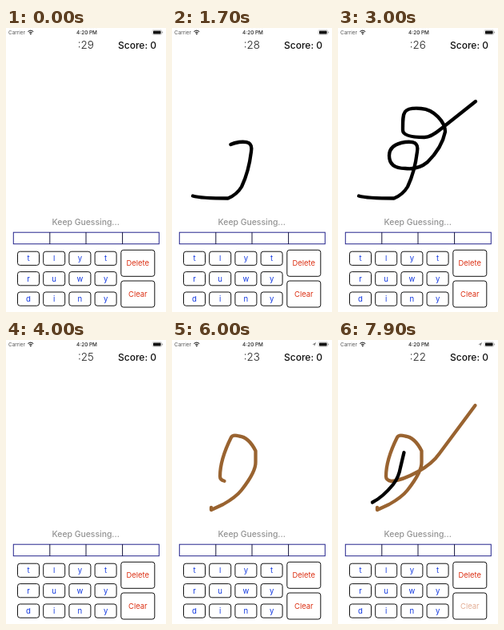
An HTML page for the animation above (8 s loop, 200x356 px).

```html
<!DOCTYPE html>
<html lang="en">
<head>
<meta charset="utf-8">
<title>Drawing game</title>
<style>
  html, body { margin: 0; width: 100%; height: 100%; overflow: hidden; background: #fff; }
  svg { display: block; width: 100%; height: 100%; }
  text { font-family: Inter, Roboto, sans-serif; text-anchor: middle; }
  .status { font-size: 6.4px; fill: #555; }
  .key { fill: #fff; stroke: #111; }
  .letter { font-size: 9.6px; fill: #1238e0; }
  .action { font-size: 9.4px; fill: #dc3014; }
  .pressed { fill: #e3ad94; }
  .ink { fill: none; stroke-width: 4.3; stroke-linecap: round; stroke-linejoin: round; }
</style>
</head>
<body>
<svg id="stage" viewBox="0 0 200 356" preserveAspectRatio="none">
  <rect width="200" height="356" fill="#fff"/>
  <text class="status" x="13.5" y="7.8">Carrier</text>
  <g fill="none" stroke="#333" stroke-width="1.1">
    <path d="M27.4 4.6Q30.8 1.6 34.2 4.6M28.9 6.2Q30.8 4.6 32.7 6.2"/>
    <circle cx="30.8" cy="7.4" r=".4"/>
  </g>
  <text class="status" x="101" y="7.8" font-weight="500" style="fill:#222">4:20 PM</text>
  <path id="arrow" d="M175.4 5.4L180.2 3L177.9 8L177.6 5.7Z" fill="#777"/>
  <rect x="183" y="2.4" width="11.6" height="6" rx="1.5" fill="none" stroke="#aaa" stroke-width=".5"/>
  <rect x="184" y="3.4" width="9.6" height="4" rx=".7" fill="#111"/>
  <rect x="195.2" y="4.4" width=".9" height="2" rx=".4" fill="#888"/>

  <text id="timer" x="99.8" y="26.2" font-size="13.4" font-weight="300" fill="#222"></text>
  <text x="164" y="25.8" font-size="12" font-weight="500" fill="#111">Score: 0</text>

  <g id="drawing"></g>

  <text x="99.7" y="246.9" font-size="10.4" font-weight="500" fill="#929292">Keep Guessing...</text>
  <rect x="9.3" y="256.2" width="182" height="14.5" fill="none" stroke="#23238c"/>
  <path d="M54.8 256V271M100 256V271M145.6 256V271" stroke="#14143c"/>
  <g id="keys"></g>
</svg>
<script>
const LOOP = 8000, STEP = 100;
const $ = id => document.getElementById(id);

function add(parent, tag, attrs, text = "") {
  const el = document.createElementNS("http://www.w3.org/2000/svg", tag);
  for (const name in attrs) el.setAttribute(name, attrs[name]);
  el.textContent = text;
  return parent.appendChild(el);
}

function addKey(label, kind, x, y, width, height) {
  add($("keys"), "rect", { class: "key", x, y, width, height, rx: 3 });
  return add($("keys"), "text", { class: kind, x: x + width / 2, y: y + height / 2 + 3.4 }, label);
}

["tlyt", "ruwy", "diny"].forEach((row, r) =>
  [...row].forEach((ch, c) => addKey(ch, "letter", 14.5 + c * 32.2, 280.2 + r * 25.4, 27, 17.2)));
addKey("Delete", "action", 143.8, 278.3, 42, 33);
const clearLabel = addKey("Clear", "action", 143.8, 317, 42, 33);

// The pen covers each path from start to end; power shapes its speed
const strokes = [
  { color: "#000", start: 1000, end: 3000, until: 4000, power: 1.1,
    d: `M26 210.5Q36 213.5 70 213.5Q81 209 87 199Q96 180 99 155
      C101 143 94 142 84 143Q64 146 64 160Q64 176 84 176Q100 178 112 168Q130 150 134 130
      C134 118 120 102 104 101C80 99 81 106 81 128Q81 137 108 137Q116 137 128 127L172 92` },
  { color: "#996330", start: 5400, end: 6200, until: LOOP, power: 1.9,
    d: `M49 210V213L64 206Q80 197 87 188Q105 165 104.5 153V139Q96 122 84 120.5
      Q76 118 74 122Q60 150 60 171Q60 176 67 177Q80 176 100 165Q118 155 127 142L171.5 82` },
  { color: "#000", start: 7000, end: 7900, until: LOOP, power: 1,
    d: "M43 203.5Q56 197 69 181Q76 172 78 160L82.5 141" }
];
for (const s of strokes)
  s.el = add($("drawing"), "path", { class: "ink", d: s.d, stroke: s.color, pathLength: 1 });

function render(ms) {
  const t = Math.floor(ms / STEP) * STEP;
  $("timer").textContent = ":" + (29 - Math.floor(t / 1000));
  $("arrow").setAttribute("opacity", t >= 5400 ? 1 : 0);
  clearLabel.classList.toggle("pressed", t >= 7900);
  for (const { el, start, end, until, power } of strokes) {
    const drawn = Math.min(1, Math.max(0, (t - start) / (end - start)) ** power);
    el.setAttribute("visibility", t >= start && t < until ? "visible" : "hidden");
    el.setAttribute("stroke-dasharray", drawn + " 2");
  }
}

const begin = performance.now();
function tick() {
  render((performance.now() - begin) % LOOP);
  requestAnimationFrame(tick);
}
tick();
</script>
</body>
</html>
```
